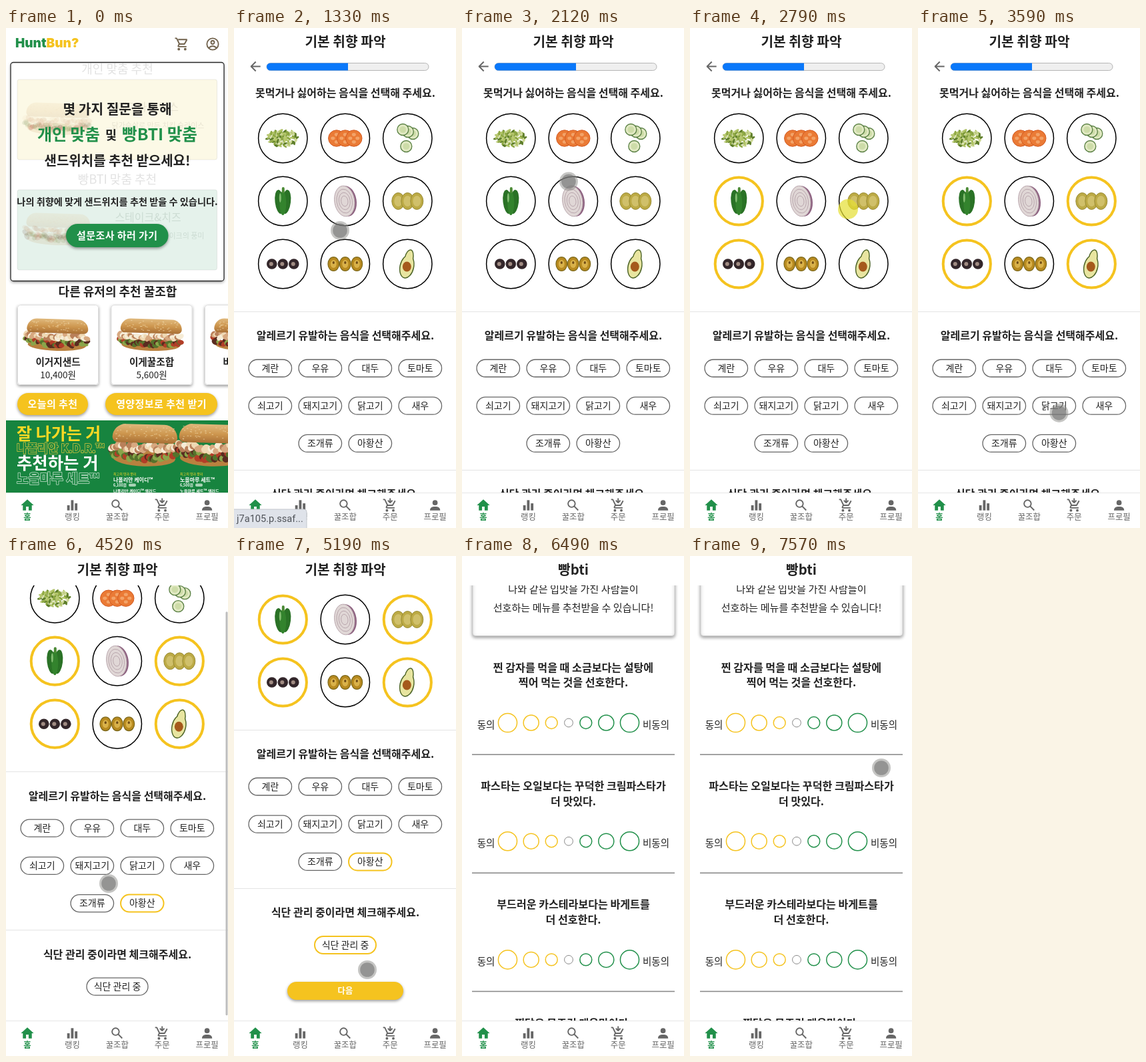
These frames come from a looping animation (333x748 px, 8000 ms). An HTML page with a canvas:

```html
<!DOCTYPE html>
<html lang="ko">
<head>
<meta charset="utf-8">
<title>샌드위치 추천</title>
<style>
html, body { margin: 0; width: 100%; height: 100%; overflow: hidden; background: #fff; }
canvas { display: block; width: 333px; height: 748px; }
</style>
</head>
<body>
<canvas id="stage"></canvas>
<script>
const W = 333, H = 748, MID = 167, LOOP = 8000, STEP = 66.4;
const GREEN = '#21904a', YELLOW = '#f5c31f', INK = '#222', GRAY = '#666', GOLD = '#fbd924';
const KO = '"Noto Sans CJK KR", "Noto Sans CJK", sans-serif';
const canvas = document.getElementById('stage');
const g = canvas.getContext('2d');
const dpr = window.devicePixelRatio || 1;
canvas.width = W * dpr;
canvas.height = H * dpr;

// ---- drawing helpers ----

function paint(fill, stroke, line) {
  if (fill) { g.fillStyle = fill; g.fill(); }
  if (stroke) { g.strokeStyle = stroke; g.lineWidth = line; g.stroke(); }
}

function box(x, y, w, h, r, fill, stroke, line = 1) {
  g.beginPath();
  g.roundRect(x, y, w, h, r);
  paint(fill, stroke, line);
}

function oval(x, y, rx, ry, fill, stroke, line = 1, turn = 0) {
  g.beginPath();
  g.ellipse(x, y, rx, ry, turn, 0, Math.PI * 2);
  paint(fill, stroke, line);
}

function disc(x, y, r, fill, stroke, line) {
  oval(x, y, r, r, fill, stroke, line);
}

function at(x, y, draw, scale = 1, turn = 0) {
  g.save();
  g.translate(x, y);
  g.rotate(turn);
  g.scale(scale, scale);
  draw();
  g.restore();
}

function shadowed(blur, draw) {
  g.save();
  g.shadowColor = 'rgba(0,0,0,.4)';
  g.shadowBlur = blur * dpr;
  g.shadowOffsetY = 2 * dpr;
  draw();
  g.restore();
}

// y is the optical middle of the line
function text(s, x, y, size, weight = 700, color = INK, align = 'center', spacing = 0) {
  g.font = `${weight} ${size}px ${KO}`;
  g.letterSpacing = spacing + 'px';
  g.textAlign = align;
  g.fillStyle = color;
  g.fillText(s, x, y + size * 0.37);
  g.letterSpacing = '0px';
}

function outlined(s, x, y, size, color) {
  g.font = `900 ${size}px ${KO}`;
  g.textAlign = 'left';
  g.lineJoin = 'round';
  g.lineWidth = 2;
  g.strokeStyle = color;
  g.strokeText(s, x, y + size * 0.37);
  g.fillStyle = '#17843f';
  g.fillText(s, x, y + size * 0.37);
}

function rule(x1, x2, y, color, line) {
  g.fillStyle = color;
  g.fillRect(x1, y - line / 2, x2 - x1, line);
}

function button(x, y, w, h, color, label, size = 15, spacing = 0.43) {
  shadowed(4, () => box(x, y, w, h, h / 2, color));
  text(label, x + w / 2, y + h / 2, size, 700, '#fff', 'center', spacing);
}

function random(seed) {
  return () => (seed = (seed * 16807) % 2147483647) / 2147483647;
}

const clamp = k => Math.max(0, Math.min(1, k));
const ease = k => k * k * (3 - 2 * k);

// ---- icons on a 24 px grid, centred on 0,0 ----

function strokePath(d, color) {
  g.strokeStyle = color;
  g.lineWidth = 2;
  g.stroke(new Path2D(d));
}

function cart(color, extra) {
  strokePath('M-11-9H-8.4L-4 0H3.8L7.8-7M-4.4 0L-6 3.2Q-6 4 -5 4H7' + extra, color);
  for (const x of [-5, 5]) disc(x, 8, 2, color);
}

const icons = {
  home(color) {
    g.fillStyle = color;
    g.fill(new Path2D('M-2 8V2H2V8H7V0H10L0-9L-10 0H-7V8z'));
  },
  rank(color) {
    [8, 16, 11].forEach((h, i) => box(i * 6 - 8, 8 - h, 4, h, 0, color));
  },
  search(color) {
    disc(-2.5, -2.5, 5.5, null, color, 2);
    strokePath('M1.5 1.5L7.8 7.8', color);
  },
  order(color) {
    cart(color, 'M0-11V-5M-3.5-7.5L0-4L3.5-7.5');
  },
  basket(color) {
    cart(color, 'M-6-7H8');
  },
  person(color) {
    disc(0, -4, 4, color);
    box(-8, 2, 16, 6, [8, 8, 0, 0], color);
  },
  account(color) {
    disc(0, 0, 9, null, color, 1.9);
    disc(0, -2.6, 2.6, null, color, 1.9);
    strokePath('M-6 6Q0 0 6 6', color);
  },
  back(color) {
    strokePath('M8 0H-7M.7-7.3L-6.6 0L.7 7.3', color);
  }
};

function icon(name, x, y, color) {
  at(x, y, () => icons[name](color), 0.96);
}

// ---- shared page parts ----

function nav() {
  g.fillStyle = '#fff';
  g.fillRect(0, 696, W, 52);
  rule(0, W, 695.5, '#e6e6e6', 1);
  Object.entries({ home: '홈', rank: '랭킹', search: '꿀조합', order: '주문', person: '프로필' })
    .forEach(([name, label], i) => {
      const x = 32 + i * 67.4, color = i ? GRAY : GREEN;
      icon(name, x, 714, color);
      text(label, x, 731.5, 12.4, i ? 400 : 700, color);
    });
}

function header(title) {
  g.fillStyle = '#fff';
  g.fillRect(0, 0, W, 44);
  text(title, MID, 20.5, 20.3);
}

// ---- home ----

function sandwich(x, y, w, h, seed, alpha = 1) {
  const rnd = random(seed);
  const layers = [['#55732c', '#8aa54a', '#b23e28', '#5a2c20'], ['#efd9b4', '#d7a880', '#b9805a', '#f6ecd6']];
  g.globalAlpha = alpha;
  at(x, y, () => {
    oval(0, h * 0.3, w * 0.44, h * 0.18, '#b9813f');
    layers.forEach((tones, row) => {
      for (let i = 0; i < 40; i++) {
        const u = i / 20 - 1;
        const dy = h * (0.26 - row * 0.2 + (rnd() - 0.5) * 0.16) * (1 - u * u * 0.3);
        oval(u * w * 0.47, dy, w * 0.05, h * 0.07, tones[Math.floor(rnd() * 4)], null, 1, rnd() * 2 - 1);
      }
    });
    const crust = g.createLinearGradient(0, -h / 2, 0, 0);
    crust.addColorStop(0, '#e2bd82');
    crust.addColorStop(0.5, '#cd964e');
    crust.addColorStop(1, '#9f6630');
    box(-w * 0.46, -h * 0.47, w * 0.92, h * 0.42, [h * 0.3, h * 0.3, h * 0.12, h * 0.12], crust);
    for (let i = 0; i < 50; i++) {
      oval((rnd() - 0.5) * w * 0.82, -h * (0.12 + rnd() * 0.3), 1.3, 0.6, 'rgba(245,222,175,.6)');
    }
  }, 1, 0.03);
  g.globalAlpha = 1;
}

function comboCard(i, name, price) {
  const x = 17 + i * 140.5;
  shadowed(4, () => box(x, 414, 122, 120, 4, '#fff'));
  box(x + 0.5, 414.5, 121, 119, 4, null, '#ddd');
  sandwich(x + 60, 459, 100, 50, 11 + i);
  text(name, x + 61, 499.5, 14.6);
  text(price, x + 61, 519, 13.5, 400);
}

function bannerItem(i, name, price) {
  const x = 161 + i * 100;
  sandwich(x + 47, 624, 106, 66, 21 + i);
  text('최고의 맛과 풍미', x, 667.5, 5, 400, GOLD, 'left');
  text(name, x, 676, 8, 700, '#fff', 'left');
  text(price, x, 684, 5.5, 700, '#fff', 'left');
  box(x + 23, 681.5, 11, 4.5, 2, '#a9d3b6');
  text(name + ' 샐러드', x, 692.5, 6.2, 700, '#fff', 'left');
}

function banner() {
  g.fillStyle = '#17843f';
  g.fillRect(0, 587, W, 109);
  text('잘 나가는 거', 16, 607, 25, 900, GOLD, 'left');
  outlined('나폴리안 K.D.R.™', 16, 629, 17, '#a9b53f');
  text('추천하는 거', 16, 651, 25.4, 900, '#fff', 'left');
  outlined('노을마루 세트™', 16, 674, 19, '#9fcdae');
  bannerItem(0, '나폴리안 케이디™', '6,100원');
  bannerItem(1, '노을마루 세트™', '6,500원');
}

// The page dimmed behind the notice
function faintCard(y, title, card, ink, name, detail) {
  text(title, MID, y - 15.5, 18, 500, '#e2e2e2');
  box(17, y, 299.5, 120, 3, card, 'rgba(0,0,0,.07)');
  sandwich(78, y + 59, 104, 50, y, 0.13);
  text(name, 213, y + 41, 16, 500, ink);
  text(detail, 228, y + 69, 11, 400, ink);
}

function notice() {
  shadowed(4, () => box(7, 51.5, 320, 327, 4, '#fff'));
  faintCard(77, '개인 맞춤 추천', '#fcf9e6', '#e8e4d2', '에그마요 박스', '닭가슴살로 만든 치킨 슬라이스');
  faintCard(242, '빵BTI 맞춤 추천', '#e5f2eb', '#ccdcd3', '스테이크&치즈', '육즙이 풍부한 스테이크의 풍미');
  box(7, 51.5, 320, 327, 4, null, '#282828', 1.3);
  text('몇 가지 질문을 통해', MID, 121, 20.3);
  text('개인 맞춤', 47, 159, 24, 700, GREEN, 'left');
  text('및', 157.5, 160, 18.5);
  text('빵BTI 맞춤', 287, 159, 24.6, 700, GREEN, 'right');
  text('샌드위치를 추천 받으세요!', MID, 198.5, 20);
  text('나의 취향에 맞게 샌드위치를 추천 받을 수 있습니다.', MID, 260, 14.2);
  button(90, 293, 153.5, 35, GREEN, '설문조사 하러 가기');
}

function home() {
  g.textAlign = 'left';
  g.font = '900 19px Inter, sans-serif';
  g.fillStyle = GREEN;
  g.fillText('Hunt', 14, 29);
  const half = g.measureText('Hunt').width;
  g.fillStyle = YELLOW;
  g.fillText('Bun?', 14 + half, 29);
  icon('basket', 264, 24, '#70614b');
  icon('account', 310, 24, '#70614b');
  notice();
  text('다른 유저의 추천 꿀조합', 167.5, 394, 18);
  comboCard(0, '이거지샌드', '10,400원');
  comboCard(1, '이게꿀조합', '5,600원');
  comboCard(2, '바로이조합', '7,200원');
  button(17, 546, 106, 33, YELLOW, '오늘의 추천');
  button(149, 546, 168, 33, YELLOW, '영양정보로 추천 받기');
  banner();
}

// ---- taste survey ----

function three(gap, draw) {
  for (const i of [-1, 0, 1]) at(i * gap, 0, draw);
}

// Food pictures, each centred on 0,0
const foods = {
  lettuce() {
    const rnd = random(77), tones = ['#8ea843', '#b3c56a', '#5d7d29', '#ccd795'];
    for (let i = 0; i < 110; i++) {
      const a = rnd() * 6.28, d = Math.sqrt(rnd());
      oval(Math.cos(a) * d * 23, Math.sin(a) * d * 12, 3.6, 1.5, tones[i % 4], null, 1, rnd() * 3);
    }
  },
  tomato() {
    three(13, () => {
      disc(0, 0, 12.2, '#ea7a35', '#d25a22');
      for (let a = 0; a < 6; a += 1.57) oval(Math.cos(a) * 5.5, Math.sin(a) * 5.5, 3, 2.4, '#f3a368');
    });
  },
  cucumber() {
    const slice = () => {
      disc(0, 0, 8.5, '#e1e9c3', '#587f42', 1.3);
      disc(0, 0, 4.8, '#cddca8');
    };
    for (let i = 0; i < 3; i++) at(8 - i * 7.5, -7 - i * 3, slice);
    at(-2, 12, slice);
  },
  pepper() {
    for (const side of [-1, 1]) oval(side * 5, 1, 6.8, 18, '#2a7226', null, 1, side * 0.12);
    oval(0, 3, 5, 18, '#33832d');
    oval(-4, -5, 1.5, 7, '#83bd72');
    box(-1.5, -21, 4, 9, 2, '#4b8a35');
  },
  onion() {
    oval(2, 0, 15, 23, '#8f6482', null, 1, -0.15);
    for (let k = 1; k > 0.2; k -= 0.22) oval(-1, 0, 15 * k, 23 * k, '#e0d7d6', '#b9a6ad', 1, -0.15);
  },
  pickle() {
    three(14, () => {
      oval(0, 0, 9.5, 12.5, '#bcaa45', '#988a33');
      oval(0, 0, 6, 8, '#d0c06a');
    });
  },
  olive() {
    three(16.5, () => {
      disc(0, 0, 7.8, '#33262a');
      disc(-1, 0, 3, '#a08b82');
    });
  },
  jalapeno() {
    three(17.5, () => {
      oval(0, 0, 8.3, 10.3, '#b88a1f', '#7f6a1b', 1.3);
      oval(0, 0, 4.5, 6, '#d9b24a');
      oval(0, -2, 1.6, 2, '#6e4b16');
    });
  },
  avocado() {
    [['#50672a', 0], ['#e8e5a0', 1.5]].forEach(([color, inset]) => {
      oval(-1, 4, 11 - inset, 18 - inset, color, null, 1, 0.22);
      oval(2, -8, 7 - inset, 14 - inset, color, null, 1, 0.22);
    });
    oval(-1, 4, 6.5, 7.5, '#a5591c');
  }
};
const allergens = ['계란', '우유', '대두', '토마토', '쇠고기', '돼지고기', '닭고기', '새우', '조개류', '아황산'];

// Start of each tap; what it hits changes when the tap ends
const taps = {
  start: 1180, pepper: 2380, olive: 2580, pickle: 2780, avocado: 3050,
  sulfite: 3770, diet: 5030, undo: 5640, next: 5960
};
const TAP = 66;
const tapped = (name, t) => t >= taps[name] + TAP;

function pill(x, y, w, label, on) {
  box(x - w / 2 + 1, y - 13, w - 2, 26, 13, '#fff', on ? YELLOW : GRAY, on ? 2 : 1.3);
  text(label, x, y - 0.5, 14, 400);
}

function foodGrid(t) {
  Object.entries(foods).forEach(([name, food], i) => {
    const on = tapped(name, t);
    const x = 73.3 + (i % 3) * 93.5, y = 165 + Math.floor(i / 3) * 94;
    disc(x, y, on ? 35.6 : 36.7, '#fff', on ? YELLOW : '#000', on ? 4 : 1.5);
    at(x, y, food);
  });
}

function survey(t) {
  const scroll = 164 * ease(clamp((t - 4238) / 477));
  at(0, -scroll, () => {
    box(49, 52.5, 243, 11, 5.5, '#efefef', '#b5b5b5');
    box(49, 52.5, 122, 11, [5.5, 0, 0, 5.5], '#0a78fa');
    text('못먹거나 싫어하는 음식을 선택해 주세요.', MID, 97, 16);
    foodGrid(t);
    rule(0, W, 424.5, '#e4e4e4', 1);
    text('알레르기 유발하는 음식을 선택해주세요.', MID, 460.5, 16);
    allergens.forEach((name, i) => {
      const col = i < 8 ? i % 4 : i - 7;
      pill(54.3 + col * 75, 509 + Math.floor(i / 4) * 56.2, 66.5, name, i === 9 && tapped('sulfite', t));
    });
    rule(0, W, 661.5, '#e4e4e4', 1);
    text('식단 관리 중이라면 체크해주세요.', MID, 697.5, 16);
    pill(MID, 746, 94, '식단 관리 중', tapped('diet', t) && !tapped('undo', t));
    button(80, 801, 174, 27, YELLOW, '다음', 12.2, 0.3);
  });
  header('기본 취향 파악');
  icon('back', 32, 57.5 - scroll, GRAY);
  if (scroll > 0 && t < 5150) box(329.5, scroll * 0.817, 3, 604, 1.5, '#bdbdbd');
}

// ---- preference quiz ----

const questions = [
  ['찐 감자를 먹을 때 소금보다는 설탕에', '찍어 먹는 것을 선호한다.'],
  ['파스타는 오일보다는 꾸덕한 크림파스타가', '더 맛있다.'],
  ['부드러운 카스테라보다는 바게트를', '더 선호한다.'],
  ['찜닭은 무조건 매운맛이다.', '']
];

function question([top, bottom]) {
  text(top, MID, 167, 16.1);
  text(bottom, MID, 189.5, 16.1);
  text('동의', 36, 252.5, 14.5, 400);
  text('비동의', 291, 252.5, 14.5, 400);
  for (let d = -3; d <= 3; d++) {
    const far = Math.abs(d);
    const color = d < 0 ? YELLOW : d > 0 ? GREEN : '#888';
    disc(160 + d * (23.45 + 2.35 * far) / (far || 1) * (far || 1), 249.5, 6.4 + 2.55 * far, null, color, d ? 1.5 : 1);
  }
  rule(15, 319, 297, '#8c8c8c', 1.6);
}

function quiz() {
  shadowed(5, () => box(16, -60, 303, 179.5, 4, '#fff', '#ccc'));
  text('나와 같은 입맛을 가진 사람들이', MID, 49, 15.2, 400);
  text('선호하는 메뉴를 추천받을 수 있습니다!', MID, 77.5, 15.1, 400);
  questions.forEach((lines, i) => at(0, i * 177.2, () => question(lines)));
  header('빵bti');
}

// ---- pointer ----

// Resting points: arrival, departure, x, y
const stops = [
  [330, 330, 333, 259], [600, 600, 126, 308], [730, 1590, 159, 303], [1950, 1950, 226, 197],
  [2320, 2440, 82, 268], [2580, 2650, 78, 350], [2788, 2788, 237, 271], [2910, 3130, 250, 347],
  [3730, 3930, 205, 615], [4300, 4760, 154, 490], [5000, 5110, 180, 586], [5179, 5320, 200, 619],
  [5500, 5690, 190, 586], [5845, 7284, 209, 662], [7285, 7285, 264, 337], [7565, LOOP, 287, 317]
];

function pointer(t) {
  if (t < 325 || (t > 6350 && t < 7285)) return;
  const i = Math.max(0, stops.findLastIndex(s => s[0] <= t));
  const [, leave, x0, y0] = stops[i];
  const [arrive, , x1, y1] = stops[i + 1] || stops[i];
  const k = t > leave ? ease(clamp((t - leave) / (arrive - leave))) : 0;
  const x = x0 + (x1 - x0) * k, y = y0 + (y1 - y0) * k;
  if (Object.values(taps).some(p => t >= p && t < p + TAP)) {
    disc(x, y, 15, 'rgba(228,222,48,.7)');
  } else {
    disc(x, y, 14, 'rgba(140,140,135,.5)');
    disc(x, y, 10.8, 'rgba(115,115,115,.6)');
  }
}

function statusBar() {
  box(-2, 720, 111, 30, [0, 4, 0, 0], '#dfe3ea', '#c3c7cd');
  g.font = '14.6px Roboto, sans-serif';
  g.textAlign = 'left';
  g.fillStyle = '#50545a';
  g.fillText('j7a105.p.ssaf...', 4, 739);
}

// ---- loop ----

function draw(now) {
  // the picture advances about fifteen times a second
  const t = Math.floor((now % LOOP) / STEP + 0.3) * STEP;
  g.setTransform(dpr, 0, 0, dpr, 0, 0);
  g.fillStyle = '#fff';
  g.fillRect(0, 0, W, H);
  if (!tapped('start', t)) home();
  else if (t < 6105) survey(t);
  else quiz();
  nav();
  if (tapped('start', t) && t < 1700) statusBar();
  pointer(t);
}

const start = performance.now();
function frame() {
  draw(performance.now() - start);
  requestAnimationFrame(frame);
}
frame();
</script>
</body>
</html>
```
